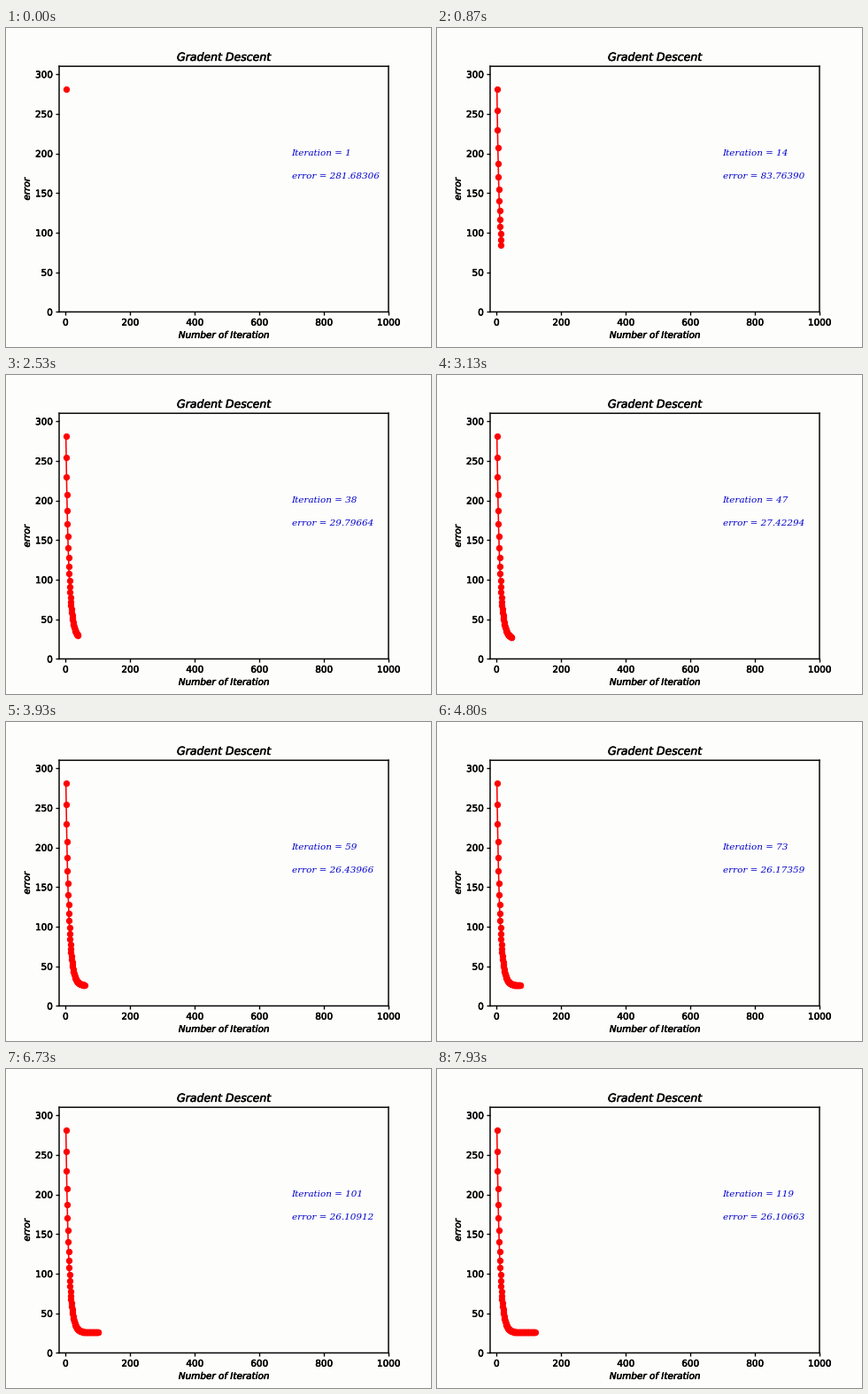
Write a matplotlib script that moves like this. It is 480 by 360 pixels and loops after 8 s.

```python
import numpy as np
import matplotlib.pyplot as plt
from matplotlib.animation import FuncAnimation
from matplotlib.patheffects import withStroke

STEPS = 120
LOOP_MS = 8000
PAPER = "#fdfdfc"


def error(n):
    """Loss after n steps: fast exponential decay onto a slowly sinking floor."""
    return 26.107117 - 7e-6 * n + 255.57595 * np.exp(-0.11453923 * (n - 1))


steps = np.arange(1, STEPS + 1)
errors = error(steps)

fig = plt.figure(figsize=(6.4, 4.8), dpi=75, facecolor=PAPER)
ax = fig.add_axes([0.125, 0.11, 0.775, 0.77], facecolor=PAPER)
ax.set_xlim(-20, 1000)
ax.set_ylim(0, 310)
ax.set_xticks(range(0, 1001, 200))
ax.set_yticks(range(0, 301, 50))
ax.tick_params(width=1.3)

title = ax.set_title("Gradent Descent", style="italic", fontsize=12)
xlabel = ax.set_xlabel("Number of Iteration", style="italic", fontsize=10)
ylabel = ax.set_ylabel("error", style="italic", fontsize=10)

# Slightly heavy lettering and frame
for text in [title, xlabel, ylabel, *ax.get_xticklabels(), *ax.get_yticklabels()]:
    text.set_path_effects([withStroke(linewidth=0.5, foreground="black")])
for spine in ax.spines.values():
    spine.set_linewidth(1.4)
    spine.set_snap(False)

curve, = ax.plot([], [], "o-", color="red", lw=1.5, ms=6)
note = dict(family="DejaVu Serif", style="italic", fontsize=10, color="mediumblue")
count_text = ax.text(700, 197.3, "", **note)
error_text = ax.text(700, 168.2, "", **note)


def update(frame):
    n = frame + 1
    curve.set_data(steps[:n], errors[:n])
    count_text.set_text(f"Iteration = {n}")
    error_text.set_text(f"error = {errors[frame]:.5f}")
    return curve, count_text, error_text


anim = FuncAnimation(fig, update, frames=STEPS, interval=LOOP_MS / STEPS,
                     init_func=lambda: update(0), repeat=True, repeat_delay=0)
plt.show()
```
